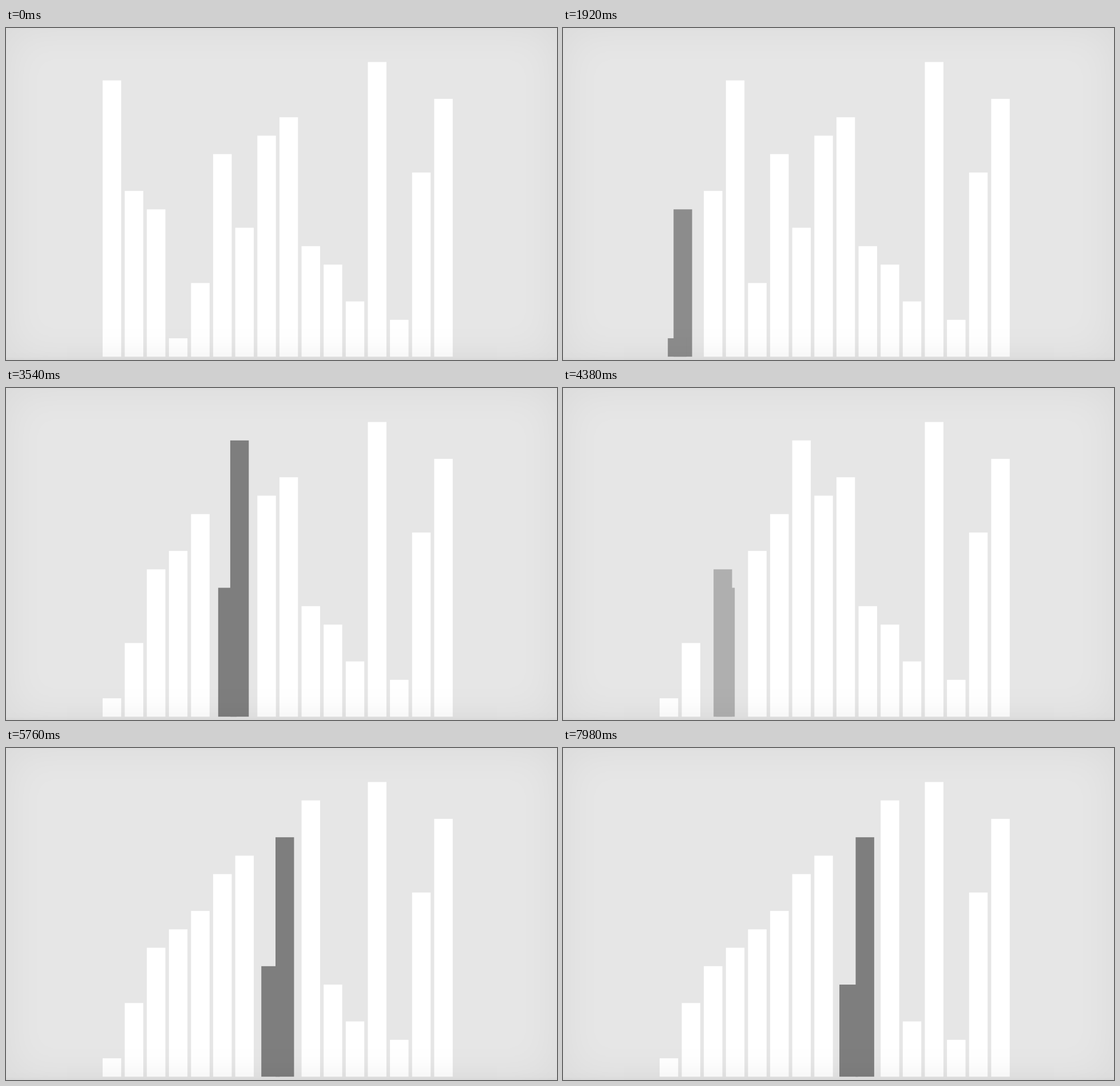
These frames come from a looping animation (963x581 px, 8000 ms). An HTML page with a canvas:

```html
<!DOCTYPE html>
<html lang="en">
<head>
<meta charset="utf-8">
<title>Insertion sort</title>
<style>
  html, body { margin: 0; width: 100%; height: 100%; overflow: hidden; background: #e6e6e6; }
  canvas { display: block; }
  .shade {
    position: fixed; left: 0; top: 0; width: 963px; height: 581px; pointer-events: none;
    background: linear-gradient(transparent 551px, rgba(0, 0, 0, .006) 574px, rgba(0, 0, 0, .03) 581px);
    box-shadow: inset 0 0 76px rgba(0, 0, 0, .055);
  }
</style>
</head>
<body>
<canvas id="stage" width="963" height="581"></canvas>
<div class="shade"></div>
<script>
const LOOP = 8000, STEP = 60;               // loop length and frame hold, ms
const START = 146.5, SWAP = 315, FADE = 223; // first swap, swap length, fade to gray
const LEFT = 168.9, PITCH = 38.63, WIDTH = 32.4, BASE = 575.2, UNIT = 32.23;
const GRAY = 126;
const values = [15, 9, 8, 1, 4, 11, 7, 12, 13, 6, 5, 3, 16, 2, 10, 14];
const ctx = document.getElementById('stage').getContext('2d');

// Each state holds the bar order before a swap of positions `at` and `at + 1`.
function sortStates(input) {
  const list = [...input], states = [];
  for (let i = 1; i < list.length; i++) {
    for (let j = i - 1; j >= 0 && list[j] > list[j + 1]; j--) {
      states.push({ order: [...list], at: j });
      [list[j], list[j + 1]] = [list[j + 1], list[j]];
    }
  }
  return states;
}
const states = sortStates(values);

function drawBar(value, slot, level) {
  ctx.fillStyle = `rgb(${level},${level},${level})`;
  ctx.fillRect(LEFT + slot * PITCH, BASE - value * UNIT, WIDTH, value * UNIT);
}

function draw(time) {
  const elapsed = Math.max(0, time - START);
  const { order, at } = states[Math.floor(elapsed / SWAP)];
  const local = elapsed % SWAP;
  const shift = local / SWAP;
  const level = Math.round(255 - (255 - GRAY) * Math.min(1, local / FADE));

  ctx.fillStyle = '#e6e6e6';
  ctx.fillRect(0, 0, 963, 581);
  order.forEach((value, slot) => {
    if (slot !== at && slot !== at + 1) drawBar(value, slot, 255);
  });
  drawBar(order[at], at + shift, level);
  drawBar(order[at + 1], at + 1 - shift, level);
}

function tick() {
  const time = performance.now() % LOOP;
  draw(Math.floor(time / STEP) * STEP);
  requestAnimationFrame(tick);
}
tick();
</script>
</body>
</html>
```
